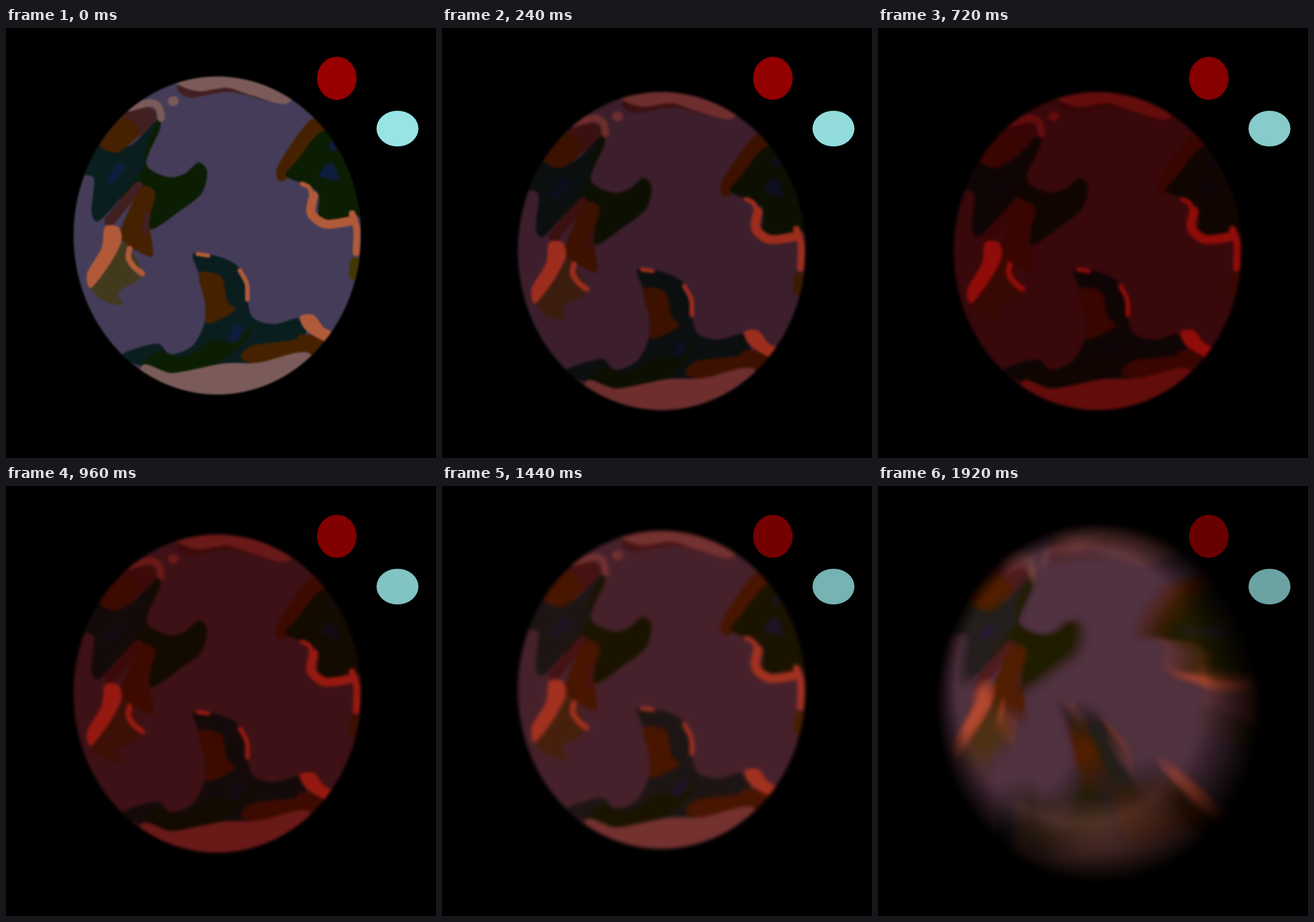
Recreate the animation shown at these times as an HTML page with a canvas. Size 748 px wide and 748 px high, loop 2.04 s.

```html
<!DOCTYPE html>
<html lang="en">
<head>
<meta charset="utf-8">
<title>Shaking planet</title>
<style>
  html, body { margin: 0; width: 100%; height: 100%; overflow: hidden; background: #000; }
  canvas { display: block; width: 100vw; height: 100vh; }
</style>
</head>
<body>
<canvas id="stage" width="748" height="748"></canvas>
<script>
const SIZE = 748, STEP = 120, STEPS = 17;
const RED_STEP = 4, LAST_STEP = STEPS - 1;
const stage = document.getElementById('stage').getContext('2d');

function layer() {
  const c = document.createElement('canvas');
  c.width = c.height = SIZE;
  return c.getContext('2d');
}

// Each material: colour at the start, when everything turns red, and at the end.
const palette = {
  sea:    ['#443c58', '#330000', '#503240'],
  ice:    ['#7b5b59', '#5e0000', '#7e4a46'],
  maroon: ['#421f20', '#330000', '#501d1c'],
  brown:  ['#452100', '#330000', '#521f00'],
  green:  ['#0b1d02', '#0c0000', '#211d00'],
  teal:   ['#0a1e1f', '#0c0000', '#251f1d'],
  blue:   ['#0e1c3e', '#0c0000', '#241d38'],
  orange: ['#b05a39', '#880000', '#b04a30'],
  olive:  ['#433a1e', '#330000', '#4f3014'],
  gold:   ['#433600', '#330000', '#4f3000']
};

const channels = hex => [1, 3, 5].map(i => parseInt(hex.slice(i, i + 2), 16));

function mix(from, to, k) {
  const a = channels(from), b = channels(to);
  return `rgb(${a.map((v, i) => Math.round(v + (b[i] - v) * k))})`;
}

function tint(name, n) {
  const [start, red, end] = palette[name];
  return n < RED_STEP
    ? mix(start, red, n / RED_STEP)
    : mix(red, end, (n - RED_STEP) / (LAST_STEP - RED_STEP));
}

// Smooth curve through the given points.
function curve(text, closed) {
  const p = text.split(' ').map(s => s.split(',').map(Number));
  const last = p.length - 1;
  const at = i => closed ? p[(i + p.length) % p.length] : p[Math.max(0, Math.min(last, i))];
  const handle = (i, side) => at(i).map((v, j) => v + side * (at(i + 1)[j] - at(i - 1)[j]) / 7);
  const path = new Path2D();
  path.moveTo(...p[0]);
  for (let i = 0; i < (closed ? p.length : last); i++) {
    path.bezierCurveTo(...handle(i, 1), ...handle(i + 1, -1), ...at(i + 1));
  }
  return path;
}

const blob = (name, points) => ({ name, path: curve(points, true) });
const band = (name, width, points) => ({ name, width, path: curve(points, false) });

const land = [
  // north cap
  blob('maroon', '302,99 318,121 388,111 456,126 400,90'),
  blob('ice', '298,97 335,110 385,104 430,118 492,130 510,60 290,70'),
  // north-west continent
  blob('green', '262,160 268,175 244,236 280,259 310,254 335,234 350,250 340,288 300,320 250,350 235,300 200,300 215,250'),
  blob('teal', '165,200 215,205 261,162 243,207 236,248 167,332 149,322 153,262 128,250'),
  blob('maroon', '195,165 222,135 256,142 260,160 228,190'),
  blob('brown', '163,195 205,156 231,183 198,215 172,212'),
  band('ice', 13, '214,139 250,130 266,138 270,157'),
  band('ice', 17, '290,127 292,127'),
  band('blue', 15, '183,262 199,243'),
  band('maroon', 18, '180,336 203,308 230,276'),
  blob('brown', '202,345 235,278 260,287 249,335 256,394 236,392 202,370'),
  band('maroon', 11, '246,326 241,355'),
  blob('olive', '205,373 220,390 236,432 196,459 202,482 165,472 148,446 185,400'),
  blob('orange', '172,346 195,346 201,370 181,410 148,452 141,427 166,383'),
  band('orange', 10, '215,384 213,400 223,416 237,427'),
  // eastern continent
  blob('brown', '530,160 473,240 485,264 570,170'),
  blob('green', '555,178 505,232 487,257 526,274 544,290 546,336 595,333 602,320 640,340 620,220'),
  blob('blue', '545,256 566,234 579,265'),
  band('blue', 10, '566,203 569,210'),
  band('orange', 8, '515,271 527,277 532,290'),
  band('orange', 16, '535,292 531,322 556,341 598,336'),
  band('orange', 12, '602,323 610,350 609,391'),
  band('gold', 17, '607,407 605,430'),
  // southern continent
  blob('teal', '326,392 385,403 412,428 427,500 465,515 508,505 524,525 480,570 300,600 200,572 262,549 286,568 325,552 347,505 340,440'),
  blob('brown', '336,427 374,432 385,475 398,492 350,514 347,480'),
  band('orange', 7, '333,393 352,396'),
  band('orange', 8, '407,422 419,445 420,472'),
  blob('green', '238,590 265,562 310,572 362,542 400,548 428,517 415,545 370,583 300,606'),
  band('blue', 16, '396,537 404,524'),
  blob('brown', '413,578 427,553 500,543 515,533 575,545 500,590'),
  blob('orange', '511,502 535,499 552,520 570,532 558,546 522,526'),
  blob('ice', '236,588 290,600 375,584 440,582 530,568 520,680 240,680')
];

function oval(ctx, x, y, rx, ry) {
  ctx.beginPath();
  ctx.ellipse(x, y, rx, ry, 0, 0, Math.PI * 2);
}

const planet = layer();
planet.lineCap = planet.lineJoin = 'round';
oval(planet, 367.5, 361, 250, 276.5);
planet.clip();

function drawPlanet(n) {
  planet.clearRect(0, 0, SIZE, SIZE);
  planet.fillStyle = tint('sea', n);
  planet.fillRect(0, 0, SIZE, SIZE);
  for (const { name, width, path } of land) {
    planet.fillStyle = planet.strokeStyle = tint(name, n);
    if (width) {
      planet.lineWidth = width;
      planet.stroke(path);
    } else {
      planet.fill(path);
    }
  }
}

// Steps at which the planet is knocked aside, with the drop of each knock.
const KNOCK_X = 14.5;
const knocks = { 2: 27, 3: 27, 6: 27, 7: 27, 10: 35, 12: -6.5, 14: 35 };
const offset = n => n in knocks ? [KNOCK_X, knocks[n]] : [0, 0];

let front = layer(), back = layer();

// Zoom blur: average an enlarged and a reduced copy, halving the spread each pass.
function zoomBlur(cx, cy, spread) {
  for (let d = spread / 2; d > spread / 50; d /= 2) {
    back.globalAlpha = 1;
    back.fillRect(0, 0, SIZE, SIZE);
    [1 + d, 1 - d].forEach((s, i) => {
      back.globalAlpha = i ? 0.5 : 1;
      back.setTransform(s, 0, 0, s, cx * (1 - s), cy * (1 - s));
      back.drawImage(front.canvas, 0, 0);
    });
    back.setTransform(1, 0, 0, 1, 0, 0);
    [front, back] = [back, front];
  }
}

function moon(x, y, rx, ry, color) {
  oval(stage, x, y, rx, ry);
  stage.fillStyle = color;
  stage.fill();
}

function draw(n) {
  const k = n / LAST_STEP;
  drawPlanet(n);
  front.globalAlpha = 1;
  front.fillRect(0, 0, SIZE, SIZE);
  front.filter = `blur(${1.7 + 2 * k}px)`;
  front.drawImage(planet.canvas, ...offset(n));
  front.filter = 'none';
  if (n === LAST_STEP) zoomBlur(250, 245, 0.135);

  stage.drawImage(front.canvas, 0, 0);
  moon(575.5, 87.5, 34.5, 37.5, mix('#980000', '#690000', k));
  moon(681, 175, 36.5, 31, mix('#98e4e4', '#6ca2a2', k));
}

const start = performance.now();
let shown = -1;
function tick() {
  const n = Math.floor((performance.now() - start) / STEP) % STEPS;
  if (n !== shown) draw(shown = n);
  requestAnimationFrame(tick);
}
tick();
</script>
</body>
</html>
```
